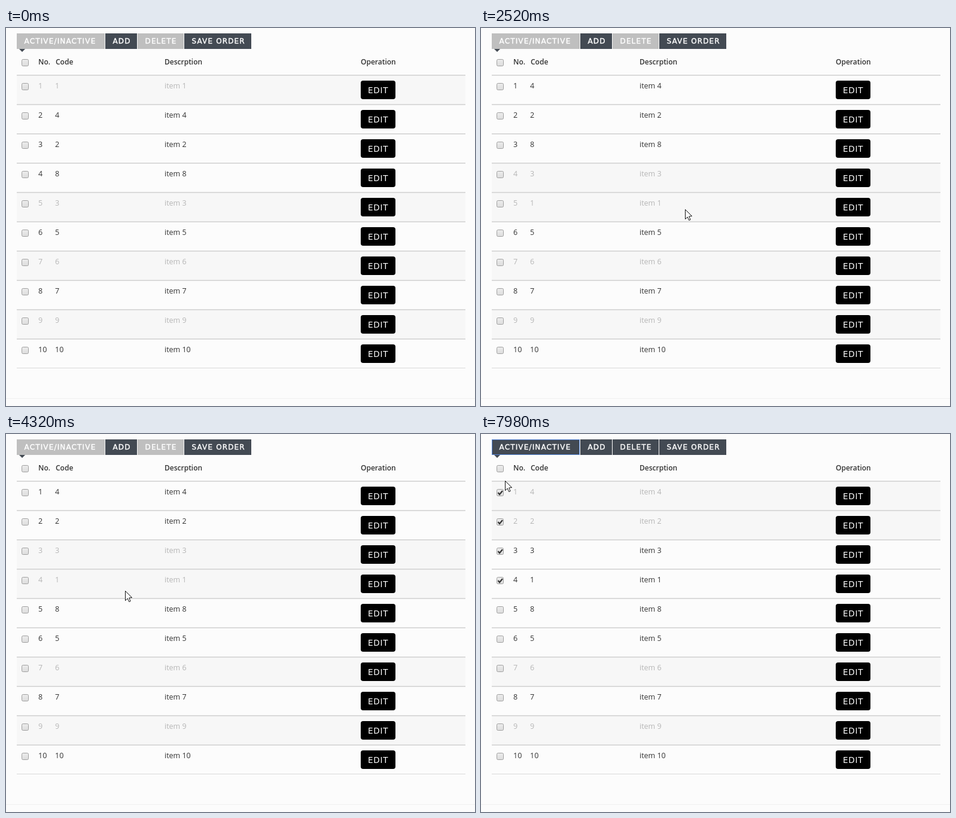
These frames come from a looping animation (784x632 px, 8000 ms). An HTML page with a canvas:

```html
<!DOCTYPE html>
<html lang="en">
<head>
<meta charset="utf-8">
<title>Sortable table</title>
<style>
  html, body { margin: 0; width: 100%; height: 100%; overflow: hidden; background: #fcfcfc; }
  canvas { display: block; }
</style>
</head>
<body>
<canvas id="stage" width="784" height="632"></canvas>
<script>
const W = 784, H = 632, LOOP = 8000, STEP = 60;
const LEFT = 18, RIGHT = 768, TOP = 79, PITCH = 49, GAP = 36;
const BODY = '12.5px "Open Sans", "Noto Sans", sans-serif';
const HEAD = '600 12px "Open Sans", "Noto Sans", sans-serif';
const CAPS = '"DejaVu Sans", Verdana, sans-serif';
const DARK = '#434a53', LINE = '#dadada', PAGE = '#fcfcfc';

const ctx = document.getElementById('stage').getContext('2d');
const layer = document.createElement('canvas');
layer.width = W;
layer.height = PITCH;
const layerCtx = layer.getContext('2d');

const CODES = [1, 4, 2, 8, 3, 5, 6, 7, 9, 10];
const INACTIVE = new Set([1, 3, 6, 9]);
const CHECKED_AT = { 3: 4800, 1: 5340, 4: 5700, 2: 6060 };
const ENABLED_AT = 4800, FOCUS_AT = 6960, TOGGLE_AT = 7140;

// The held row follows the pointer at a distance of grab, which shrinks by slip px per ms
const DRAGS = [
  { from: 0, to: 4, start: 1320, drop: 2400, grab: 146, slip: 0.0375 },
  { from: 2, to: 4, start: 3240, drop: 3960, grab: 205, slip: 0 }
];

const ENTER = { t: 420, x: 764, y: 31 };
const MOVES = [
  { t: 420, end: 600, x: 622, y: 33 },
  { t: 600, end: 1200, x: 313, y: 94 },
  { t: 1260, end: 1500, x: 322, y: 209 },
  { t: 1500, end: 1980, x: 326, y: 314 },
  { t: 1980, end: 2220, x: 328, y: 338 },
  { t: 2340, end: 3000, x: 374, y: 209 },
  { t: 3180, end: 3660, x: 364, y: 320 },
  { t: 3660, end: 3780, x: 364, y: 327 },
  { t: 3900, end: 4740, x: 34, y: 196 },
  { t: 4800, end: 5100, x: 33, y: 246 },
  { t: 5340, end: 5640, x: 34, y: 99 },
  { t: 5700, end: 6000, x: 33, y: 146 },
  { t: 6060, end: 6780, x: 140, y: 24 },
  { t: 7260, end: 7680, x: 34, y: 188 },
  { t: 7680, end: 7980, x: 40, y: 78 }
];

function pointerAt(t) {
  let { x, y } = ENTER;
  for (const m of MOVES) {
    if (t <= m.t) break;
    const p = Math.min(1, (t - m.t) / (m.end - m.t));
    x += (m.x - x) * p;
    y += (m.y - y) * p;
  }
  return { x: Math.round(x), y: Math.round(y) };
}

function rect(c, x, y, w, h, fill) {
  c.fillStyle = fill;
  c.fillRect(x, y, w, h);
}

function text(c, str, x, y, font, fill, spacing = 0, weight = 0) {
  c.font = font;
  c.letterSpacing = spacing + 'px';
  c.fillStyle = c.strokeStyle = fill;
  c.fillText(str, x, y);
  if (!weight) return;
  c.lineWidth = weight;
  c.strokeText(str, x, y);
}

function poly(c, points, fill, stroke) {
  c.beginPath();
  points.forEach(([x, y]) => c.lineTo(x, y));
  c.closePath();
  c.fillStyle = fill;
  c.fill();
  if (!stroke) return;
  c.strokeStyle = stroke;
  c.lineWidth = 1;
  c.stroke();
}

function checkbox(c, y, checked) {
  const shade = c.createLinearGradient(0, y, 0, y + 12);
  shade.addColorStop(0, '#ededed');
  shade.addColorStop(1, '#dcdcdc');
  c.beginPath();
  c.roundRect(26.5, y + 0.5, 11, 11, 2);
  c.fillStyle = shade;
  c.fill();
  c.strokeStyle = '#a0a0a0';
  c.lineWidth = 1;
  c.stroke();
  if (!checked) return;
  c.beginPath();
  c.moveTo(28.5, y + 6);
  c.lineTo(31, y + 9);
  c.lineTo(36, y + 3);
  c.strokeStyle = '#333';
  c.lineWidth = 2.2;
  c.stroke();
}

function drawRow(c, row, y, background) {
  const ink = row.active ? '#333' : '#b6b6b6';
  rect(c, LEFT, y, RIGHT - LEFT, PITCH, background);
  rect(c, LEFT, y, RIGHT - LEFT, 1, LINE);
  rect(c, LEFT, y + PITCH - 1, RIGHT - LEFT, 1, LINE);
  checkbox(c, y + 13, row.checked);
  text(c, row.no, 54, y + 22, BODY, ink);
  text(c, row.code, 82, y + 22, BODY, ink);
  text(c, 'item ' + row.code, 265, y + 22, BODY, ink);
  c.beginPath();
  c.roundRect(593, y + 9, 58, 31, 4);
  c.fillStyle = '#000';
  c.fill();
  text(c, 'EDIT', 605, y + 30, '13.5px ' + CAPS, '#fff', 0.8);
}

function drawToolbar(t) {
  const on = t >= ENABLED_AT;
  const buttons = [
    ['ACTIVE/INACTIVE', 147, on], ['ADD', 53, true], ['DELETE', 77, on], ['SAVE ORDER', 112, true]
  ];
  let x = LEFT;
  for (const [label, w, enabled] of buttons) {
    rect(ctx, x, 9, w, 26, enabled ? DARK : '#bfbfbf');
    text(ctx, label, x + 12.5, 26, '12px ' + CAPS, '#fff', 1.15, 0.4);
    x += w + 1;
  }
  poly(ctx, [[22, 35], [32, 35], [27, 40]], DARK);
  if (t >= FOCUS_AT) {
    ctx.strokeStyle = '#5585d6';
    ctx.lineWidth = 1;
    ctx.strokeRect(LEFT + 0.5, 9.5, 146, 25);
  }
}

function drawHeader() {
  checkbox(ctx, 52, false);
  [['No.', 54], ['Code', 83], ['Descrption', 265], ['Operation', 593]]
    .forEach(([label, x]) => text(ctx, label, x, 61, HEAD, '#333'));
  rect(ctx, LEFT, TOP - 1, RIGHT - LEFT, 1, LINE);
}

function rowsAt(t) {
  const rows = CODES.map((code, i) => ({
    code, no: i + 1,
    checked: t >= CHECKED_AT[code],
    active: INACTIVE.has(code) === (t >= TOGGLE_AT && code in CHECKED_AT)
  }));
  for (const d of DRAGS) {
    if (t < d.drop) break;
    rows.splice(d.to, 0, rows.splice(d.from, 1)[0]);
    rows.forEach((row, i) => { row.no = i + 1; });
  }
  return rows;
}

function drawTable(t, pointer) {
  const rows = rowsAt(t);
  const drag = DRAGS.find(d => t >= d.start && t < d.drop);
  let held, offset = 0, slot = rows.length;
  if (drag) {
    held = rows.splice(drag.from, 1)[0];
    const pull = pointer.y - drag.grab + drag.slip * (t - drag.start);
    offset = drag.from * PITCH + Math.max(0, Math.round(pull));
    slot = Math.floor(offset / PITCH + 0.3);
  }
  rows.forEach((row, i) => {
    const y = TOP + i * PITCH + (i >= slot ? GAP : 0);
    drawRow(ctx, row, y, row.active ? PAGE : '#f7f7f7');
  });
  if (!held) return;
  // Inactive rows have a nearly clear background while they float
  layerCtx.clearRect(0, 0, W, PITCH);
  drawRow(layerCtx, held, 0, held.active ? PAGE : 'rgba(0,0,0,0.015)');
  ctx.globalAlpha = 0.8;
  ctx.drawImage(layer, 0, TOP + offset);
  ctx.globalAlpha = 1;
}

function drawPointer(t, { x, y }) {
  if (t < ENTER.t) return;
  const sizing = DRAGS.some(d => t > d.start && t < d.drop);
  ctx.save();
  ctx.translate(x + 0.5, y + 0.5);
  if (sizing) {
    const half = [[0, -11], [4, -7], [4, -6], [1.5, -6], [1.5, 6], [4, 6], [4, 7], [0, 11]];
    const mirror = half.slice(1, -1).reverse().map(([px, py]) => [-px, py]);
    poly(ctx, half.concat(mirror), '#fff', '#111');
  } else {
    poly(ctx, [[0, 0], [0, 16], [3.7, 12.5], [6.2, 18], [8.6, 17], [6.2, 11.5], [11, 11]],
      '#fff', '#111');
  }
  ctx.restore();
}

function render(t) {
  const pointer = pointerAt(t);
  rect(ctx, 0, 0, W, H, PAGE);
  rect(ctx, 0, 619, W, 1, '#f0f0f0');
  drawToolbar(t);
  drawHeader();
  drawTable(t, pointer);
  drawPointer(t, pointer);
}

const begin = performance.now();
function tick() {
  const t = (performance.now() - begin) % LOOP;
  render(Math.floor(t / STEP) * STEP);
  requestAnimationFrame(tick);
}
tick();
</script>
</body>
</html>
```
